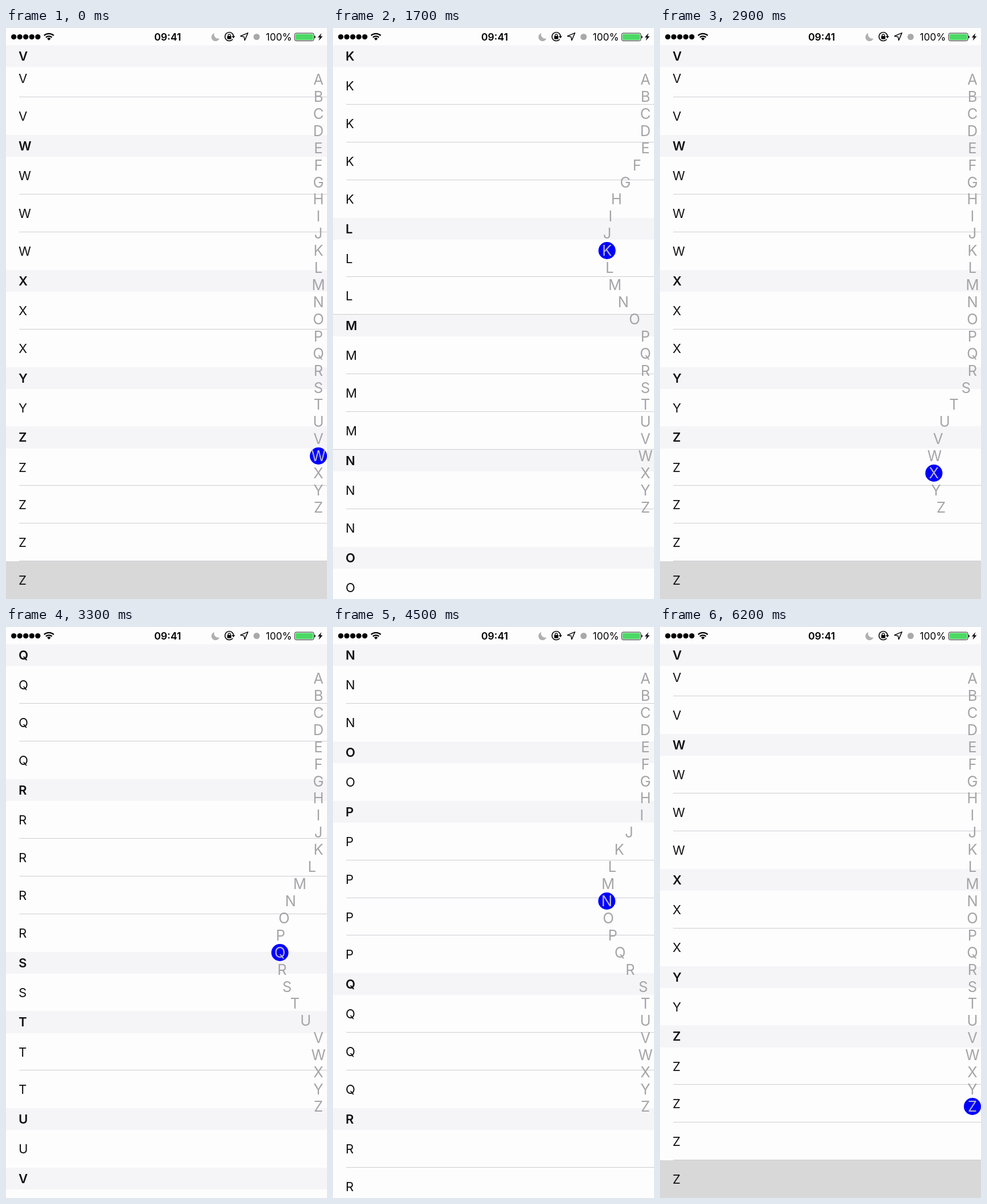
Write an HTML page that moves like this. It is 561x998 px and loops after 6300 ms.

```html
<!DOCTYPE html>
<html lang="en">
<head>
<meta charset="utf-8">
<title>Alphabet index</title>
<style>
  html, body { margin: 0; width: 100%; height: 100%; overflow: hidden; background: #fefdfe; }
  body { position: relative; font-family: Inter, Roboto, sans-serif; color: #111; }
  #status { position: absolute; left: 0; top: 0; width: 561px; height: 30px; }
  #list { position: absolute; left: 0; top: 30px; width: 561px; height: 968px; overflow: hidden; }
  .head, .row { box-sizing: border-box; padding: 1px 0 0 22px; font-size: 22px; }
  .head { position: sticky; top: 0; z-index: 1; height: 38.1px; line-height: 37.1px; font-weight: 600; background: #f5f4f7; }
  .row { position: relative; height: 65.86px; line-height: 64.86px; }
  .row::after { content: ""; position: absolute; left: 23px; right: 0; bottom: 0; height: 1px; background: #cdccd0; }
  .row:last-child::after { display: none; }
  .edge .row:last-child::after { display: block; left: 0; }
  .picked { background: #d9d8d9; }
  #index { position: absolute; left: 0; top: 0; z-index: 2; }
  .key { position: absolute; left: 531px; width: 30px; height: 30px; border-radius: 50%; text-align: center;
         font-size: 25.5px; line-height: 30px; color: #a5a4a7; }
  .key.on { background: #00f; color: #b9b7c6; }
</style>
</head>
<body>
<div id="list"></div>
<div id="index"></div>
<svg id="status" viewBox="0 0 561 30">
  <g id="signal"></g>
  <g fill="none" stroke="#000" stroke-width="2.3">
    <path d="M66.5 13.2a12.5 12.5 0 0 1 17 0M69.7 16.4a8 8 0 0 1 10.6 0"/>
    <path d="M75 21.8l-3.2-3.3a4.7 4.7 0 0 1 6.4 0z" fill="#000" stroke="none"/>
  </g>
  <text x="282.5" y="21.5" text-anchor="middle" font-size="17.6" font-weight="600">09:41</text>
  <path d="M364 9a7.2 7.2 0 1 0 9 9.2a7.3 7.3 0 0 1-9-9.2z" fill="#b0afb2"/>
  <path d="M396.2 19.6a7.5 7.5 0 1 1 1.5-4.2" fill="none" stroke="#000" stroke-width="1.5"/>
  <path d="M394.4 14.2h6l-3 3.8z"/>
  <rect x="386.6" y="14" width="7.2" height="5.4" rx=".8"/>
  <path d="M388.2 14.5v-1.6a2 2 0 0 1 4 0v1.6" fill="none" stroke="#000" stroke-width="1.3"/>
  <path d="M422.8 8.6l-5.6 13-1.2-6.2-6.2-1.2z" fill="none" stroke="#000" stroke-width="1.4" stroke-linejoin="round"/>
  <circle cx="438" cy="15.5" r="5.5" fill="#a9a8ab"/>
  <text x="454" y="21.5" font-size="17.2">100%</text>
  <rect x="504.6" y="9" width="33.4" height="13.4" rx="2.4" fill="none" stroke="#222" stroke-width="1"/>
  <rect x="506" y="10.4" width="30.6" height="10.6" rx="1.3" fill="#4cd964"/>
  <path d="M539 13.2a2.6 2.6 0 0 1 0 5z"/>
  <path d="M551.4 9l-6.6 7.4h3.6l-1.8 5.8 6.8-7.6h-3.8z"/>
</svg>
<script type="module">
const LETTERS = [..."ABCDEFGHIJKLMNOPQRSTUVWXYZ"];
const ROWS = [..."31244432414232143412123214"].map(Number);
const HEAD = 38.1, ROW = 65.86, PITCH = 29.92;
const LOOP = 6300, STEP = 100;

// Finger position in index units: [ms, position]
const PATH = [
  [0, 22], [100, 21.6], [700, 0], [1100, -1.5], [1300, -1.5], [1700, 9.6], [1900, 9.6],
  [2500, 19.2], [2800, 24.5], [3300, 15.74], [3900, 2.1], [4050, 0.2], [4500, 12.95],
  [5000, 25], [5400, 29.4], [5600, 29.4], [5800, 31.5], [LOOP, 31.5]
];

const list = document.getElementById("list");
const index = document.getElementById("index");

function add(parent, className, text = "") {
  const el = document.createElement("div");
  el.className = className;
  el.textContent = text;
  return parent.appendChild(el);
}

let offset = 0;
const offsets = [];
const keys = LETTERS.map((letter, i) => {
  const section = add(list, "LM".includes(letter) ? "edge" : "");
  add(section, "head", letter);
  for (let n = 0; n < ROWS[i]; n++) add(section, "row", letter);
  offsets.push(offset);
  offset += HEAD + ROWS[i] * ROW;
  const key = add(index, "key", letter);
  key.style.top = 75 + i * PITCH + "px";
  return key;
});
list.lastChild.lastChild.classList.add("picked");

document.getElementById("signal").innerHTML =
  [0, 1, 2, 3, 4].map(i => `<circle cx="${13.6 + i * 10.5}" cy="15.5" r="4.6"/>`).join("");

function fingerAt(t) {
  const n = PATH.findIndex(point => point[0] > t);
  const [t0, p0] = PATH[n - 1], [t1, p1] = PATH[n];
  return p0 + (p1 - p0) * (t - t0) / (t1 - t0);
}

function draw(now) {
  const t = Math.floor(now % LOOP / STEP) * STEP;
  const finger = fingerAt(t);
  const selected = Math.min(25, Math.max(0, Math.ceil(finger)));
  const strength = Math.min(1, t / 200);
  keys.forEach((key, i) => {
    const bulge = Math.max(0, 67.5 - 2.5 * (i - finger) ** 2) * strength;
    key.style.transform = `translateX(${-bulge}px)`;
    key.classList.toggle("on", i === selected);
  });
  list.scrollTop = offsets[selected];
}

const start = performance.now();
function tick() {
  draw(Math.max(0, performance.now() - start));
  requestAnimationFrame(tick);
}
tick();
</script>
</body>
</html>
```
